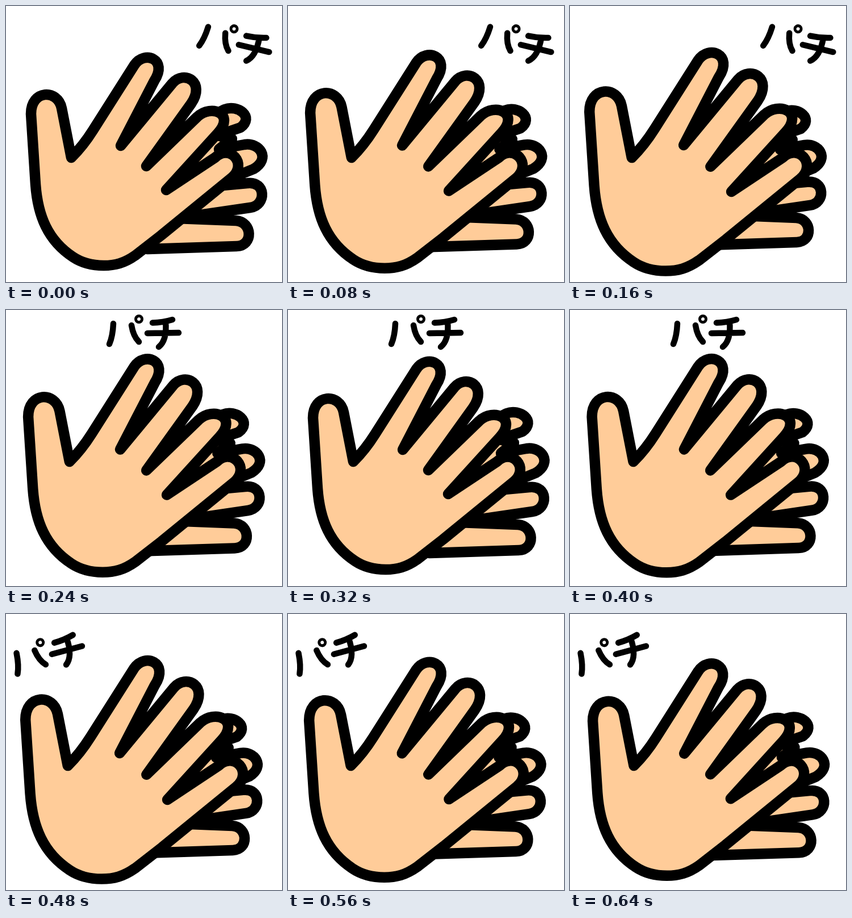
Write an HTML page with a canvas that moves like this. It is 486 by 486 pixels and loops after 0.72 s.

```html
<!DOCTYPE html>
<html lang="ja">
<head>
<meta charset="utf-8">
<title>Clapping hands</title>
<style>
html, body { margin: 0; width: 100%; height: 100%; overflow: hidden; background: #fff; }
canvas { display: block; }
</style>
</head>
<body>
<canvas id="stage" width="486" height="486"></canvas>
<script>
const ctx = document.getElementById('stage').getContext('2d');
const STEP = 80;
// How far the hands are pressed together at each step, 0 to 10
const PRESS = [0, 5, 10, 5, 0, 5.5, 10, 7, 4];

const front = new Path2D(`M44 190 C44 147 91 146 98 180 L115 267
  Q136 246 153 219 L226 104 C244 77 286 94 261 132 L202 246
  L293 136 C314 112 352 134 326 172 L247 282
  L337 195 C362 172 404 190 373 224 L282 324
  L368 267 C394 242 426 278 398 302
  L273 404 L228 439 C208 453 192 457 172 457
  C150 457 133 452 118 442 C74 413 56 370 52 314 Z`);

const back = new Path2D(`M300 250 L340 205
  L385 182 C408 173 438 195 413 214 L372 228 L398 234 L375 252
  L420 244 C446 240 467 268 436 287 L360 318
  L425 312 C458 308 459 351 430 355 L300 374
  L405 378 C434 380 436 422 406 423 L250 428 L230 400 Z`);

// The clap sound, lettered around its own centre
const strokes = new Path2D(`M-55 -17 Q-56 5 -62 19
  M-23 -14 Q-20 5 -10 15
  M49 -24 Q32 -19 14 -18.5
  M5 0 L60 -1
  M37 -21 Q40 12 25 24`);
const ring = new Path2D('M-4.5 -25 a5.5 5.5 0 1 1 -11 0 a5.5 5.5 0 1 1 11 0');
const PLACES = [[405, 67, 14.5], [244, 41, 0], [76, 72, -14]];

function drawHand(path, scale, cx, cy) {
  const shape = new Path2D();
  shape.addPath(path, new DOMMatrix().translate(cx, cy).scale(scale).translate(-cx, -cy));
  ctx.fillStyle = '#fc9';
  ctx.lineWidth = 18.5;
  ctx.fill(shape);
  ctx.stroke(shape);
}

function drawSound([x, y, angle]) {
  ctx.save();
  ctx.translate(x, y);
  ctx.rotate(angle * Math.PI / 180);
  ctx.lineWidth = 10.5;
  ctx.stroke(strokes);
  ctx.lineWidth = 5;
  ctx.stroke(ring);
  ctx.restore();
}

function draw(now) {
  const step = Math.floor(now / STEP) % PRESS.length;
  const press = PRESS[step] / 10;
  ctx.fillStyle = '#fff';
  ctx.fillRect(0, 0, 486, 486);
  ctx.strokeStyle = '#000';
  ctx.lineCap = ctx.lineJoin = 'round';
  drawHand(back, 1 - 0.045 * press, 260, 265);
  drawHand(front, 1 + 0.05 * press, 240, 265);
  drawSound(PLACES[Math.floor(step / 3)]);
}

let start;
function tick(now) {
  start ??= now;
  draw(now - start);
  requestAnimationFrame(tick);
}
draw(0);
requestAnimationFrame(tick);
</script>
</body>
</html>
```
